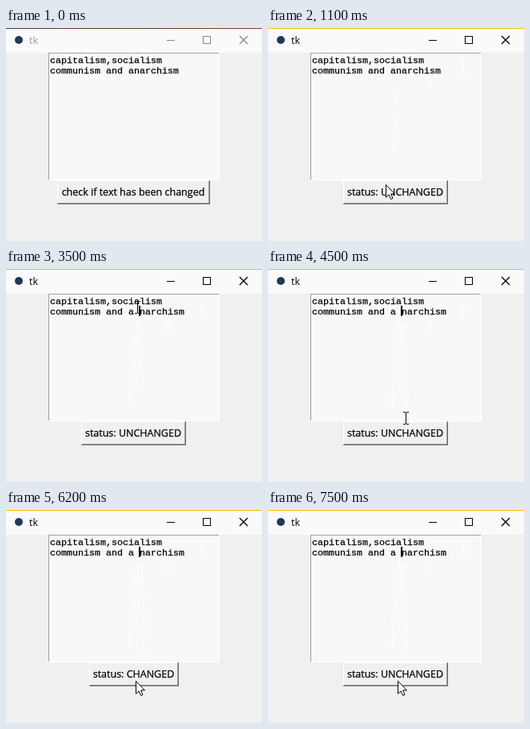
Animation of 320 by 267 pixels, one loop 8000 ms. Source, as an HTML page:

```html
<!DOCTYPE html>
<html lang="en">
<head>
<meta charset="utf-8">
<title>tk</title>
<style>
  html, body { margin: 0; width: 100%; height: 100%; overflow: hidden; background: #f0f0f0; }
  svg { display: block; width: 320px; height: 267px; }
  text { white-space: pre; }
  .ui { font: 12.5px "Open Sans", "Noto Sans", sans-serif; }
  .mono { font: 11.667px "Liberation Mono", monospace; }
  .mono, #label { stroke: #000; stroke-width: 0.25px; }
  .crisp { shape-rendering: crispEdges; }
  .beam { fill: none; stroke: #000; }
  .ghost { fill: none; stroke: #fff; }
  #chrome { --ink: #000; --glyph: #000; }
  #chrome.idle { --ink: #999; --glyph: #888; }
  #chrome text { fill: var(--ink); }
  #chrome path { fill: none; stroke: var(--glyph); }
  #chrome .close { stroke-width: 1.4px; }
</style>
</head>
<body>
<svg viewBox="0 0 320 267">
  <defs>
    <linearGradient id="desk">
      <stop offset="0" stop-color="#4a3b37"/>
      <stop offset="1" stop-color="#6b402c"/>
    </linearGradient>
    <path id="ibeam" class="crisp" d="M-3-7.5h3M1-7.5h3M.5-7V7M-3 7.5h3M1 7.5h3"/>
  </defs>
  <rect width="320" height="267" fill="#f0f0f0"/>

  <g id="chrome">
    <rect width="320" height="31" fill="#fafafa"/>
    <rect id="edge" width="320" height="1"/>
    <circle cx="16" cy="15" r="5" fill="#1f3a55"/>
    <text class="ui" x="29" y="20">tk</text>
    <path class="crisp" d="M201 15.5h10M246.5 10.5h9v9h-9z"/>
    <path class="close" d="M292 10l10 10M302 10l-10 10"/>
  </g>

  <g class="crisp">
    <rect x="53" y="31" width="214" height="160" fill="#fff"/>
    <rect x="53" y="31" width="213" height="159" fill="#a0a0a0"/>
    <rect x="54" y="32" width="212" height="158" fill="#f8f8f8"/>
  </g>
  <g id="ghosts"></g>
  <text class="mono" x="55" y="44">capitalism,socialism</text>
  <text class="mono" x="55" y="57" id="line"></text>
  <rect id="caret" class="crisp" y="46" width="2" height="13"/>

  <g class="crisp" id="bevel"></g>
  <text class="ui" id="label" text-anchor="middle"></text>

  <use id="beam" class="beam" href="#ibeam"/>
  <path id="arrow" d="M.5.5V16.4L4.1 13 6.6 18.5 9 17.5 6.6 12H11.4Z" fill="#fff" stroke="#000"/>
</svg>

<script>
const LOOP = 8000, STEP = 100;
const BUTTON_TOP = 191, BUTTON_H = 30;
const FOCUSED = 1000, CARET_SET = 2600, TYPED = 3500;
const BLINK = 800, BLINK_ON = 500;
const $ = id => document.getElementById(id);

const linear = u => u;
const easeOut = u => 1 - (1 - u) ** 2;

// Pointer glides through a few key points
const moves = [
  { from: 100, to: 500, ease: linear, pts: [[244, 52], [160, 90], [156, 148]] },
  { from: 600, to: 1000, ease: linear, pts: [[149, 191], [147, 196]] },
  { from: 1700, to: 2600, ease: easeOut, pts: [[147, 196], [166, 123], [164, 48]] },
  { from: 3800, to: 4500, ease: linear, pts: [[168, 60], [172, 124], [172, 187]] },
  { from: 4600, to: 4700, ease: linear, pts: [[168, 195], [168, 198]] },
  { from: 5500, to: 6200, ease: linear, pts: [[168, 198], [162, 214]] }
];

const idle = { release: 0, width: 191, label: "check if text has been changed" };
const clicks = [
  { press: 1000, release: 1100, width: 131, label: "status: UNCHANGED" },
  { press: 4700, release: 4900, width: 112, label: "status: CHANGED" },
  { press: 7100, release: 7300, width: 131, label: "status: UNCHANGED" }
];

const show = (el, on) => el.setAttribute("visibility", on ? "visible" : "hidden");
const place = (el, { x, y }) => el.setAttribute("transform", `translate(${x} ${y})`);

function pointerAt(t) {
  const move = moves.findLast(m => m.from <= t);
  if (!move) return null;
  const { from, to, ease, pts } = move;
  const pos = ease(Math.min(1, (t - from) / (to - from))) * (pts.length - 1);
  const i = Math.min(Math.floor(pos), pts.length - 2);
  const [x, y] = [0, 1].map(k =>
    Math.round(pts[i][k] + (pts[i + 1][k] - pts[i][k]) * (pos - i)));
  return { x, y, onText: y < BUTTON_TOP };
}

// Faint marks stay where the pointer has crossed the blank text area
const ghosts = [];
for (let t = 0; t < LOOP; t += STEP) {
  const p = pointerAt(t), next = pointerAt(t + STEP);
  if (!p?.onText || (p.x === next.x && p.y === next.y)) continue;
  if (p.y < 62 && p.x < 224) continue;
  const el = document.createElementNS("http://www.w3.org/2000/svg", "use");
  el.setAttribute("href", "#ibeam");
  el.setAttribute("class", "ghost");
  place(el, p);
  $("ghosts").append(el);
  ghosts.push({ el, from: t + STEP });
}

function bevel(x, w, inset, light, dark) {
  const y = BUTTON_TOP + inset, h = BUTTON_H - 2 * inset;
  x += inset;
  w -= 2 * inset;
  return `<rect x="${x}" y="${y}" width="${w}" height="${h}" fill="${dark}"/>` +
    `<rect x="${x}" y="${y}" width="${w - 1}" height="${h - 1}" fill="${light}"/>`;
}

function drawButton({ width, label }, pressed) {
  const left = Math.floor(160 - width / 2);
  const rims = pressed
    ? [["#696969", "#fff"], ["#a0a0a0", "#e3e3e3"]]
    : [["#fff", "#696969"], ["#f0f0f0", "#a0a0a0"]];
  $("bevel").innerHTML = rims.map((c, i) => bevel(left, width, i, ...c)).join("") +
    bevel(left, width, 2, "#f0f0f0", "#f0f0f0");
  const shift = pressed ? 1 : 0;
  $("label").textContent = label;
  $("label").setAttribute("x", left + width / 2 - 0.5 + shift);
  $("label").setAttribute("y", 210 + shift);
}

function draw(t) {
  const active = t >= FOCUSED;
  $("chrome").setAttribute("class", active ? "" : "idle");
  $("edge").setAttribute("fill", active ? "#ffb900" : "url(#desk)");

  // Typing restarts the blink
  const typed = t >= TYPED;
  const phase = (t - (typed ? TYPED : CARET_SET)) % BLINK;
  $("line").textContent = `communism and a${typed ? " " : ""}narchism`;
  $("caret").setAttribute("x", typed ? 166 : 159);
  show($("caret"), t >= CARET_SET && phase < BLINK_ON);

  drawButton(clicks.findLast(c => c.release <= t) ?? idle,
    clicks.some(c => c.press <= t && t < c.release));

  const p = pointerAt(t);
  show($("beam"), p?.onText);
  show($("arrow"), p && !p.onText);
  if (p) place(p.onText ? $("beam") : $("arrow"), p);
  for (const g of ghosts) show(g.el, t >= g.from);
}

const start = performance.now();
let last = -1;
function tick() {
  const t = Math.floor((performance.now() - start) % LOOP / STEP) * STEP;
  if (t !== last) draw(last = t);
  requestAnimationFrame(tick);
}
tick();
</script>
</body>
</html>
```
